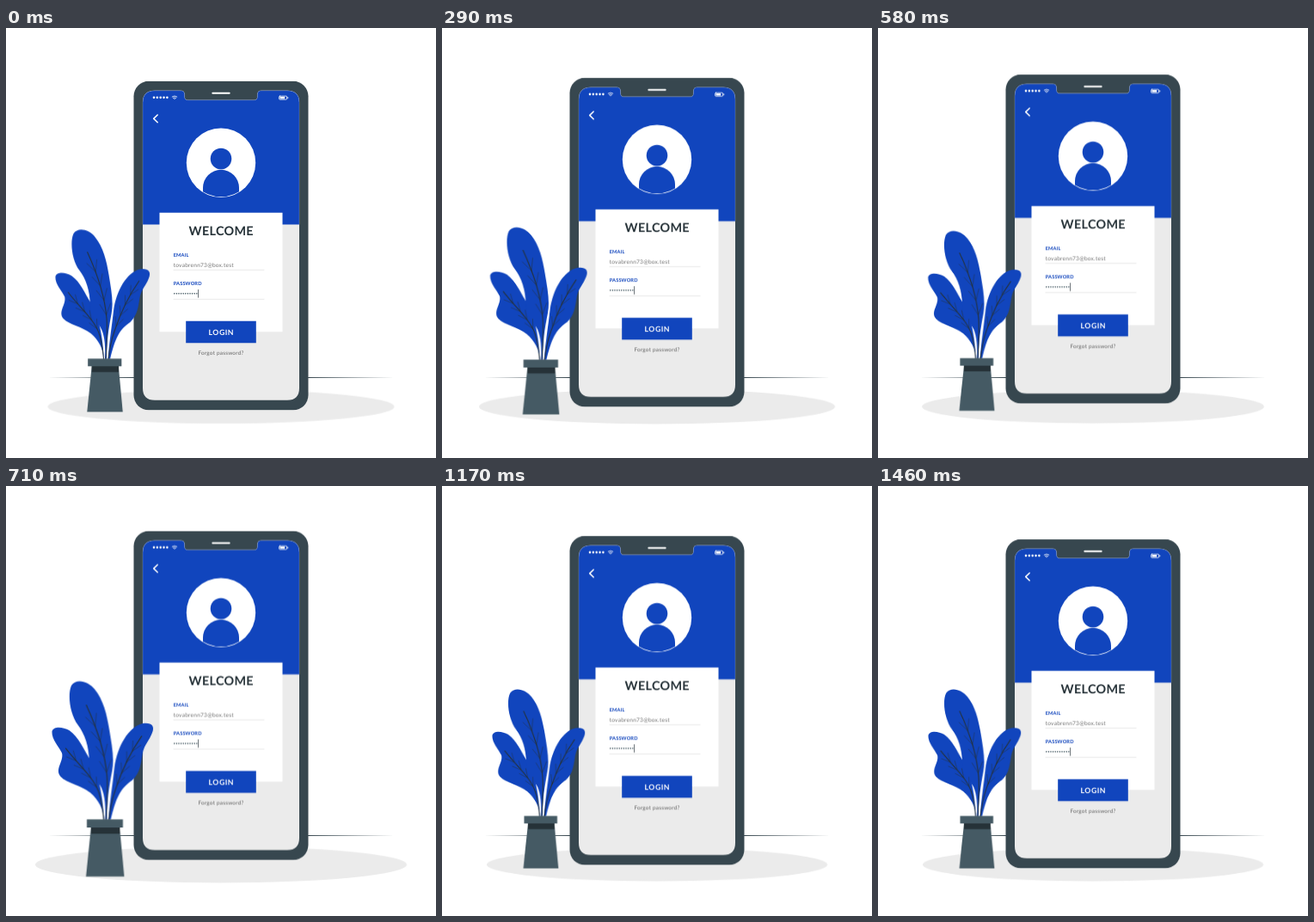
Animation of 500 by 500 pixels, one loop 1.5 s. Source, as an HTML page:

```html
<!DOCTYPE html>
<html lang="en">
<head>
<meta charset="utf-8">
<title>Login</title>
<style>
  html, body { margin: 0; width: 100%; height: 100%; overflow: hidden; background: #fff; }
  svg { display: block; width: 100vw; height: 100vh; }
  text { font-family: Lato, "Open Sans", sans-serif; text-rendering: geometricPrecision; }
  .blue { fill: #1145bd; }
  .dark { fill: #37474f; }
  .slate { fill: #455a64; }
  .pale { fill: #ebebeb; }
  .white { fill: #fff; }
  .line { fill: none; stroke-linecap: round; stroke-linejoin: round; }
  .mid { text-anchor: middle; }
  .bold { font-weight: 700; }
  .label { font-size: 5.7px; letter-spacing: .13px; }
  #shadow { transform-origin: 250px 440.3px; }
  #plant { transform-origin: 112.6px 340.3px; }
  #veins { stroke: #263238; }
</style>
</head>
<body>
<svg viewBox="0 0 500 500">
  <defs>
    <path id="screen" d="M173 73.2H203Q207.6 73.2 207.6 77.5V80Q207.6 84.2 212 84.2H288Q292.4 84.2 292.4 80V77.5Q292.4 73.2 297 73.2H327Q341 73.2 341 87.2V419.2Q341 433.2 327 433.2H173Q159 433.2 159 419.2V87.2Q159 73.2 173 73.2Z"/>
    <clipPath id="header"><rect x="150" y="60" width="200" height="168.9"/></clipPath>
    <clipPath id="face"><circle cx="250" cy="157.1" r="39.6"/></clipPath>
  </defs>

  <ellipse id="shadow" class="pale" cx="250" cy="440.3" rx="198" ry="19.3"/>
  <path class="dark" d="M49 406.500L150 406H350L451 406.500L350 407H150Z"/>

  <g id="phone">
    <rect class="dark" x="148.500" y="62.200" width="203" height="382.500" rx="17.500"/>
    <use href="#screen" class="pale"/>
    <use href="#screen" class="blue" clip-path="url(#header)"/>
    <use href="#screen" fill="none" stroke="#ebebeb" stroke-width=".2" clip-path="url(#header)"/>
    <path class="line" stroke="#fff" stroke-width="2" d="M240.300 76H259.700"/>

    <g id="dots" class="white"></g>
    <g class="line" stroke="#fff" stroke-width=".8">
      <path d="M193.200 80.300Q196 78.200 198.800 80.300M194.400 81.700Q196 80.500 197.600 81.700M195.800 82.900H196.200"/>
      <rect x="317.600" y="79.500" width="9" height="4" rx=".8"/>
      <path d="M327.800 80.900V82.100"/>
    </g>
    <rect class="white" x="318.500" y="80.300" width="5.600" height="2.400"/>
    <path class="line" stroke="#fff" stroke-width="1.500" d="M176.200 101.300L171.700 105.700L176.200 110.100"/>

    <circle class="white" cx="250" cy="157.100" r="40.200"/>
    <g class="blue" clip-path="url(#face)">
      <circle cx="250" cy="152.400" r="12.300"/>
      <path d="M229 200V186.200A21 21 0 0 1 271 186.200V200Z"/>
    </g>

    <rect class="white" x="178.500" y="215.100" width="143" height="138.500"/>
    <text class="mid bold" x="250.200" y="241" font-size="14.400" letter-spacing=".3" fill="#263238">WELCOME</text>
    <text class="label bold blue" x="194.700" y="266.100">EMAIL</text>
    <text x="194.700" y="278.300" font-size="6.600" letter-spacing=".22" fill="#777">tovabrenn73@box.test</text>
    <text class="label bold blue" x="194.700" y="299.500">PASSWORD</text>
    <g id="secret" fill="#455a64"></g>
    <path class="line" stroke="#263238" stroke-width=".7" d="M223.600 304.800V313.600"/>
    <path class="line" stroke="#c7c7c7" stroke-width=".4" d="M195 281.700H300M195 315.700H300"/>

    <rect class="blue" x="209.200" y="341.100" width="81.600" height="25.500"/>
    <text class="mid bold white" x="250.300" y="357.400" font-size="8.700" letter-spacing=".55">LOGIN</text>
    <text class="mid" x="250" y="380.200" font-size="6.400" letter-spacing=".22" fill="#666">Forgot password?</text>
  </g>

  <g id="plant">
    <g class="blue">
      <path d="M113.500 384C113 372 108 363 99 355C89 347 74 345 67.500 338C61 330 71 322 69 313C66 306 58 299 58.400 290C60 284 70 285 77 289C87 296 92 309 99 320C106 332 112 350 114 384Z"/>
      <path d="M115 384C116 366 114 352 108 345C99 336 98 332 98 322C98 306 93 292 86 283C77 271 75 250 79 241C84 233 97 236 104 245C113 256 117 272 119.500 288C122 304 125 318 122.500 332C119 350 117 364 117 384Z"/>
      <path d="M118.500 384C120 364 123 346 125 328C128 306 140 285 155 281.500C163 280 169 283 165 292C162 300 157 304 155 313C153 324 153 333 144 342C131 351 127 360 121 384Z"/>
    </g>
    <g id="veins" class="line"></g>
    <path class="slate" d="M100 392H130.500L135.400 444.600H94.600Z"/>
    <rect x="100" y="392" width="30.800" height="7" fill="#263238"/>
    <rect class="slate" x="95.500" y="383.700" width="38.500" height="8.700"/>
  </g>
</svg>
<script>
  const $ = id => document.getElementById(id);
  const ns = 'http://www.w3.org/2000/svg';

  function add(parent, tag, attrs) {
    const el = document.createElementNS(ns, tag);
    for (const key in attrs) el.setAttribute(key, attrs[key]);
    $(parent).append(el);
    return el;
  }

  function dotRow(parent, count, x, y, gap, r) {
    for (let i = 0; i < count; i++) add(parent, 'circle', { cx: x + i * gap, cy: y, r });
  }
  dotRow('dots', 5, 172, 81.2, 3.85, 1.3);
  dotRow('secret', 11, 195.8, 309.2, 2.6, 0.8);

  // Main rib of each leaf, with side veins angled back toward the tip.
  const ribs = [
    { d: 'M73 308C86 325 102 338 108 354Q112 366 113.500 384', count: 4, reach: 11 },
    { d: 'M95 262C106 286 115 312 117 338Q118 354 116 384', count: 4, reach: 14 },
    { d: 'M154 295C142 312 132 334 126 352Q121 366 119 384', count: 4, reach: 11 }
  ];
  for (const { d, count, reach } of ribs) {
    const rib = add('veins', 'path', { d, 'stroke-width': 1 });
    const length = rib.getTotalLength();
    for (let i = 1; i <= count; i++) {
      const at = length * (0.06 + 0.54 * i / count);
      const p = rib.getPointAtLength(at);
      const q = rib.getPointAtLength(at - 2);
      const heading = Math.atan2(q.y - p.y, q.x - p.x);
      for (const side of [-0.45, 0.45]) {
        const x = p.x + reach * Math.cos(heading + side);
        const y = p.y + reach * Math.sin(heading + side);
        add('veins', 'path', { d: `M${p.x} ${p.y}L${x} ${y}`, 'stroke-width': 0.45 });
      }
    }
  }

  const timing = { duration: 1500, delay: -25, iterations: Infinity };
  const beat = [[0, 1], [0.1, 1.1], [0.3, 1], [0.4, 1], [0.5, 1.1], [0.6, 1], [1, 1]]
    .map(([offset, size]) => ({ offset, transform: `scale(${size})` }));
  const float = [0, -10, 0].map(y => ({ transform: `translateY(${y}px)` }));

  $('phone').animate(float, timing);
  $('plant').animate(beat, timing);
  $('shadow').animate(beat, timing);
</script>
</body>
</html>
```
